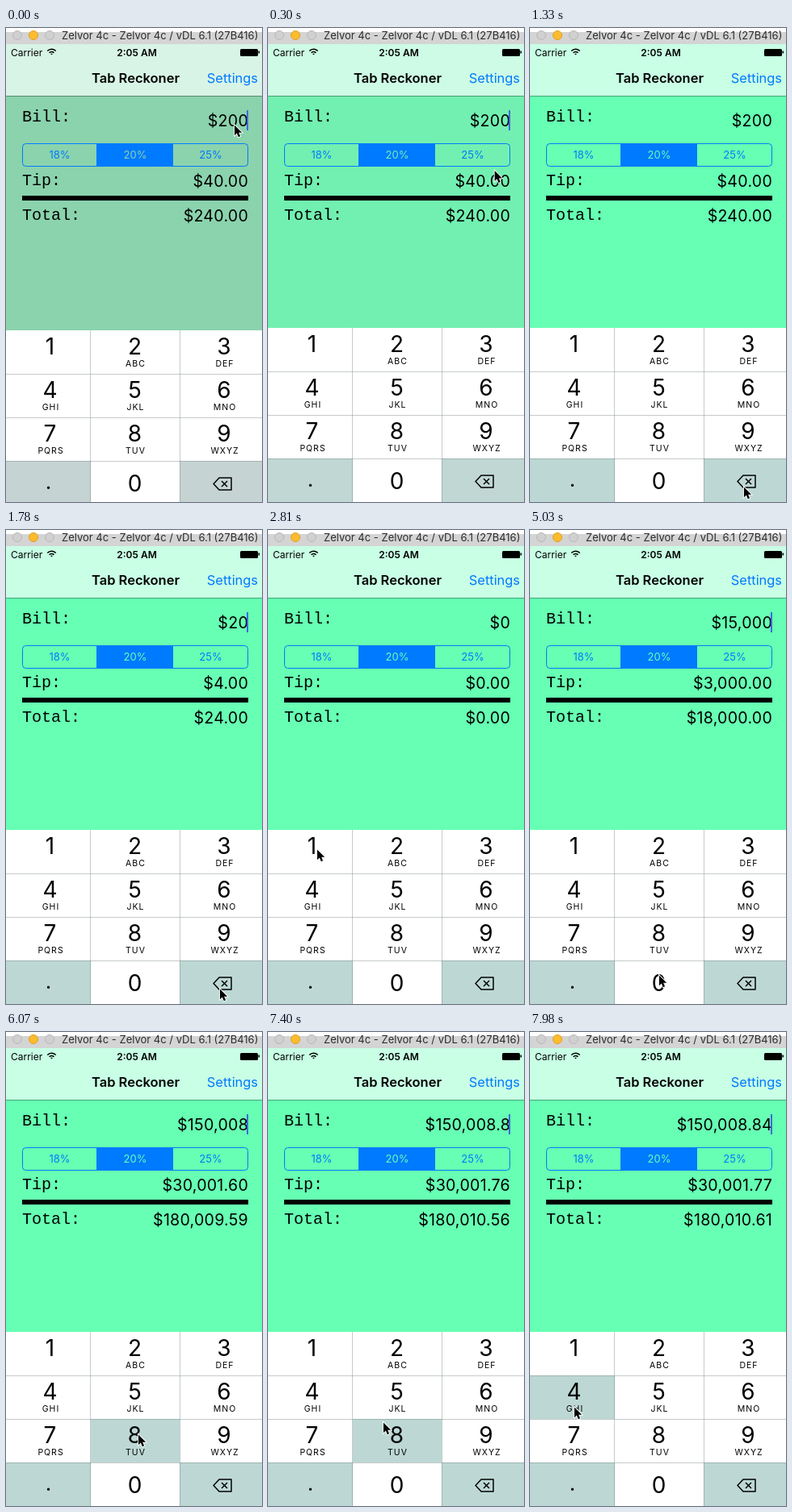
Animation of 317x588 px, one loop 8000 ms. Source, as an HTML page with a canvas:

```html
<!DOCTYPE html>
<html lang="en">
<head>
<meta charset="utf-8">
<title>Bill splitter demo</title>
<style>
html, body { margin: 0; width: 317px; height: 588px; overflow: hidden; }
canvas { display: block; }
</style>
</head>
<body>
<canvas id="stage" width="317" height="588"></canvas>
<script>
const ctx = document.getElementById('stage').getContext('2d');
const LOOP = 8000, TICK = 147.8;
const BLUE = '#007aff';
const SANS = 'Inter, Roboto, sans-serif';
const MONO = '"Liberation Mono", "DejaVu Sans Mono", monospace';

// All schedules are in ticks.
const typed = [[0, '200'], [11, '20'], [15, '2'], [17, '0'], [20, '1'], [25, '15'],
  [28, '150'], [31, '1500'], [34, '15000'], [40, '150008'], [47, '150008.'],
  [49, '150008.8'], [53, '150008.84']];
const presses = [['del', 10, 12], ['del', 14, 15], ['del', 16, 17], ['1', 20, 21],
  ['5', 25, 26], ['0', 27, 28], ['0', 30, 31], ['0', 33, 34], ['8', 41, 42],
  ['.', 47, 48], ['8', 50, 51], ['4', 54, 55]];
const caretOff = [[3, 6], [9, 11], [18, 20], [36, 38], [44, 45]];
const pointer = [[0, 282, 119], [9, 264, 568], [17, 264, 568], [19, 60, 395],
  [21, 60, 395], [24, 152, 450], [25, 152, 450], [27, 159, 551], [37, 159, 551],
  [40, 163, 498], [41, 163, 498], [47, 54, 562], [49, 160, 490], [50, 142, 483],
  [53, 54, 462], [54, 54, 464]];
const keys = [['1', ''], ['2', 'ABC'], ['3', 'DEF'], ['4', 'GHI'], ['5', 'JKL'], ['6', 'MNO'],
  ['7', 'PQRS'], ['8', 'TUV'], ['9', 'WXYZ'], ['.', ''], ['0', ''], ['del', '']];
const colEdge = [0, 105, 215, 317], colMid = [54.5, 159.5, 270];

const lerp = (a, b, p) => a + (b - a) * p;
const smooth = p => p * p * (3 - 2 * p);
const mix = (a, b, p) => `rgb(${a.map((v, i) => Math.round(lerp(v, b[i], p)))})`;

function rect(x, y, w, h, color) {
  ctx.fillStyle = color;
  ctx.fillRect(x, y, w, h);
}

function text(str, x, y, font, color = '#000', align = 'left', spacing = 0) {
  ctx.font = font;
  ctx.fillStyle = color;
  ctx.textAlign = align;
  ctx.letterSpacing = spacing + 'px';
  ctx.fillText(str, x, y);
}

function path(points, close) {
  ctx.beginPath();
  points.forEach(([x, y]) => ctx.lineTo(x, y));
  if (close) ctx.closePath();
}

function disc(x, y, r, fill, stroke) {
  ctx.beginPath();
  ctx.arc(x, y, r, 0, 7);
  ctx.fillStyle = fill;
  ctx.fill();
  ctx.strokeStyle = stroke;
  ctx.lineWidth = 1;
  ctx.stroke();
}

function money(value) {
  return '$' + Math.fround(value).toLocaleString('en-US',
    { minimumFractionDigits: 2, maximumFractionDigits: 2 });
}

function billText(raw) {
  const [whole, cents] = raw.split('.');
  return '$' + (+whole).toLocaleString('en-US') + (cents === undefined ? '' : '.' + cents);
}

function drawWindowBar() {
  rect(0, 0, 317, 20, '#d4d4d4');
  rect(0, 0, 317, 5, '#fff');
  disc(14, 9, 5.5, '#d0d0d0', '#b8b8b8');
  disc(34, 9, 5.5, '#fdbc2e', '#dfa023');
  disc(54, 9, 5.5, '#d0d0d0', '#b8b8b8');
  text('Zelvor 4c - Zelvor 4c / vDL 6.1 (27B416)', 69, 14, '13px ' + SANS, '#2c2c2c');
}

function drawHeader(color) {
  rect(0, 20, 317, 64, color);
  rect(0, 84, 317, 1, 'rgba(0,0,0,.35)');
  text('Carrier', 6, 34.5, '12px ' + SANS);
  text('2:05 AM', 162, 34.5, '600 12px ' + SANS, '#000', 'center');
  ctx.strokeStyle = '#000';
  ctx.lineWidth = 1.6;
  for (const r of [1, 4, 7.2]) {
    ctx.beginPath();
    ctx.arc(56.5, 33.5, r, -Math.PI * 0.76, -Math.PI * 0.24);
    ctx.stroke();
  }
  ctx.fillStyle = '#000';
  ctx.beginPath();
  ctx.roundRect(290, 26, 22, 9, 1.5);
  ctx.fill();
  rect(312.5, 28.5, 1.5, 3, '#000');
  text('Tab Reckoner', 160.5, 68, '600 16.5px ' + SANS, '#000', 'center');
  text('Settings', 312, 68, '16.4px ' + SANS, BLUE, 'right');
}

function drawForm(bg, tick) {
  const raw = typed.filter(e => e[0] <= tick).pop()[1];
  const bill = parseFloat(raw);
  const rows = [['Bill:', billText(raw), 115.5, 122], ['Tip:', money(bill * 0.2), 194.5, 196.5],
    ['Total:', money(bill * 1.2), 237.5, 239.5]];
  for (const [label, amount, y1, y2] of rows) {
    text(label, 20, y1, '20px ' + MONO);
    text(amount, 300, y2, '19.6px ' + SANS, '#000', 'right', 0.25);
  }
  if (!caretOff.some(([a, b]) => tick >= a && tick < b)) rect(298, 102, 2, 25, '#4169e1');

  ctx.strokeStyle = BLUE;
  ctx.lineWidth = 1;
  ctx.beginPath();
  ctx.roundRect(20.5, 143.5, 279, 28, 4);
  ctx.stroke();
  rect(112, 143, 95, 29, BLUE);
  ['18%', '20%', '25%'].forEach((s, i) =>
    text(s, 66.5 + i * 93.5, 162, '13px ' + SANS, i === 1 ? bg : BLUE, 'center'));
  rect(20, 208, 280, 6, '#000');
}

function drawDelete(y) {
  ctx.strokeStyle = '#000';
  ctx.lineWidth = 1.5;
  ctx.lineJoin = 'round';
  path([[257, y], [264, y - 7.5], [279, y - 7.5], [279, y + 7.5], [264, y + 7.5]], true);
  ctx.stroke();
  for (const s of [-1, 1]) {
    path([[267, y - 3.5 * s], [274, y + 3.5 * s]]);
    ctx.stroke();
  }
}

function drawKeypad(top, shade, tick) {
  keys.forEach(([name, letters], i) => {
    const col = i % 3, y = top + Math.floor(i / 3) * 54, x = colMid[col];
    const left = colEdge[col];
    const special = name === '.' || name === 'del';
    const pressed = presses.some(([k, a, b]) => k === name && tick >= a && tick < b);
    rect(left, y, colEdge[col + 1] - left, 55, special !== pressed ? shade : '#fff');
    if (name === 'del') drawDelete(y + 28.5);
    else if (name === '.') text('.', 52.5, y + 35, '26px ' + SANS, '#000', 'center');
    else text(name, x, y + (name === '0' ? 37.5 : 29.5), '28px ' + SANS, '#000', 'center');
    if (letters) text(letters, x + 1, y + 45, '10.5px ' + SANS, '#000', 'center', 1);
  });
  const line = 'rgba(110,125,122,.4)';
  for (let r = 1; r < 4; r++) rect(0, top + r * 54, 317, 1, line);
  rect(104, top, 1, 216, line);
  rect(215, top, 1, 216, line);
}

function drawPointer(tick) {
  let n = pointer.findIndex(p => p[0] > tick);
  if (n < 0) n = pointer.length - 1;
  const a = pointer[n - 1], b = pointer[n];
  const p = smooth(Math.min(1, (tick - a[0]) / (b[0] - a[0])));
  ctx.save();
  ctx.translate(lerp(a[1], b[1], p) + 0.5, lerp(a[2], b[2], p) + 1);
  ctx.scale(0.88, 0.88);
  path([[0.5, 0.5], [0.5, 15], [3.8, 12], [6, 17.3], [8.6, 16.2], [6.4, 11.2], [11, 11]], true);
  ctx.lineWidth = 2;
  ctx.lineJoin = 'miter';
  ctx.strokeStyle = '#fff';
  ctx.stroke();
  ctx.fillStyle = '#000';
  ctx.fill();
  ctx.restore();
}

function draw(now) {
  const tick = Math.floor((now % LOOP) / TICK + 0.03);
  const fade = Math.min(1, tick / 3);
  const bg = mix([138, 211, 173], [102, 255, 179], fade);
  rect(0, 0, 317, 588, bg);
  drawWindowBar();
  drawHeader(mix([216, 244, 230], [200, 255, 229], fade));
  drawForm(bg, tick);
  drawKeypad(Math.max(372, 375 - tick * 2), mix([197, 212, 211], [189, 216, 212], fade), tick);
  drawPointer(tick);
}

const start = performance.now();
function loop() {
  draw(performance.now() - start);
  requestAnimationFrame(loop);
}
loop();
</script>
</body>
</html>
```
